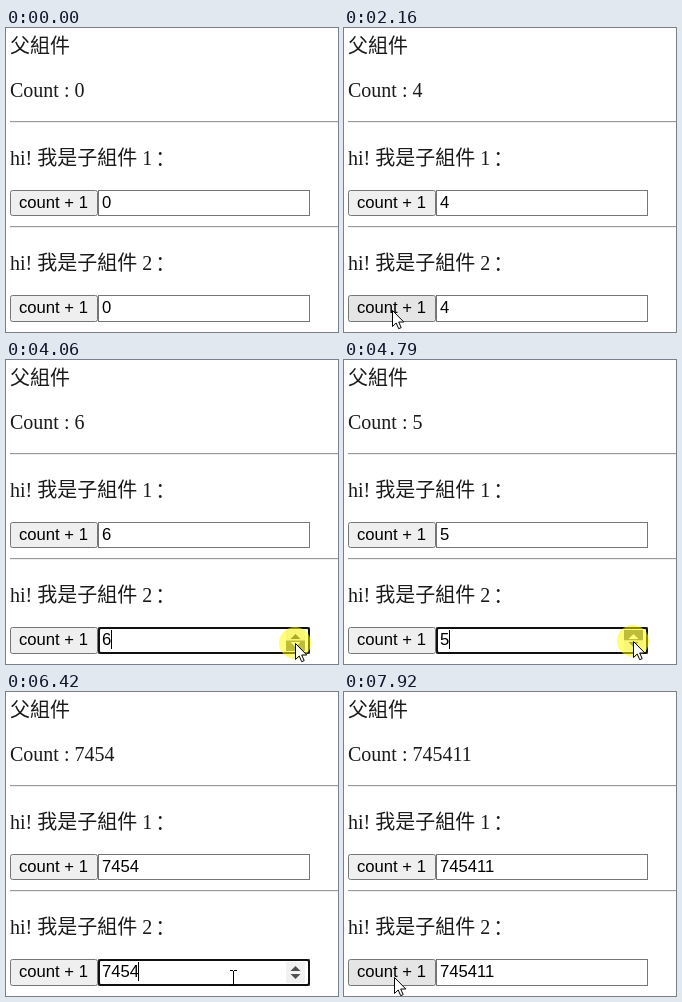
An HTML page for the animation above (7990 ms loop, 332 by 304 pixels).

```html
<!DOCTYPE html>
<html lang="zh-Hant">
<head>
<meta charset="utf-8">
<title>父組件</title>
<style>
html, body { margin: 0; width: 100%; height: 100%; overflow: hidden; background: #fff; }
svg { display: block; width: 332px; height: 304px; }
text { white-space: pre; fill: #000; }
.serif { font: 300 20px "Liberation Serif", "Noto Sans CJK TC", "Noto Sans CJK", serif; fill: #1a1a1a; }
.ui { font: 16.667px "Liberation Sans", Arial, sans-serif; }
.box { stroke: #767676; fill: #fff; }
.button { fill: #efefef; }
</style>
</head>
<body>
<svg id="stage" viewBox="0 0 332 304">
  <text class="serif" x="4" y="25">父組件</text>
  <text class="serif" x="4" y="69">Count : <tspan class="value">0</tspan></text>
  <g id="rows"></g>
  <g id="spin">
    <rect id="upBox" x="280" y="270" width="19" height="10.5"/>
    <rect id="downBox" x="280" y="280.5" width="19" height="10.5"/>
    <path id="upArrow" d="M284.5 279 l5 -5 l5 5z"/>
    <path id="downArrow" d="M284.5 282 l5 5 l5 -5z"/>
  </g>
  <rect id="ring" x="93" y="268" width="210" height="25" rx="2" fill="none" stroke="#101010" stroke-width="2"/>
  <rect id="caret" y="270" width="1" height="19"/>
  <g id="cursor">
    <circle id="halo" r="16" fill="#fffc00" fill-opacity=".52"/>
    <path id="arrow" d="M.5 .5 V16.5 L4.2 13 L6.7 18.7 L9.2 17.6 L6.7 12 H11.8 Z" fill="#fff" stroke="#000"/>
    <path id="beam" d="M-3 -7.5 h3 m1 0 h3 M.5 -7 V7 M-3 7.5 h3 m1 0 h3" fill="none" stroke="#000"/>
  </g>
</svg>
<script>
const LOOP = 7990, TICK = 70, PRESS = 75;
const $ = id => document.getElementById(id);

const row = (n, y, h) => `
  <path d="M4 ${y + .5} H332" stroke="#9a9a9a"/>
  <path d="M4 ${y + 1.5} H332" stroke="#eee"/>
  <text class="serif" x="4" y="${y + 44}">hi! 我是子組件 ${n}<tspan dx="-2" dy="1.5">：</tspan></text>
  <rect class="box button" x="4.5" y="${y + 69.5}" width="87" height="${h}" rx="2"/>
  <text class="ui" x="13" y="${y + 87}">count + 1</text>
  <rect class="box" x="92.5" y="${y + 69.5}" width="211" height="${h}"/>
  <text class="ui value" x="95.9" y="${y + 87}">0</text>`;
$('rows').innerHTML = row(1, 93, 25) + row(2, 198, 26);

const button = document.querySelectorAll('.button')[1];
const values = document.querySelectorAll('.value');

// Typed input turns the value into a string, so a later "+ 1" appends a digit
const add = v => v + 1;
const subtract = v => v - 1;
const type = key => v => v + key;

const repeat = (n, start, gap, make) => Array.from({ length: n }, (_, i) => make(start + i * gap, i));
const click = start => ({ start, end: start + PRESS, time: start + PRESS, edit: add });
const spin = edit => start => ({ start, end: start + PRESS, time: start, edit });

const events = [
  click(1280),
  ...repeat(5, 1760, 160, click),
  spin(add)(3600),
  ...repeat(3, 4000, 135, spin(subtract)),
  ...repeat(3, 4790, 140, spin(add)),
  ...repeat(3, 6100, 160, (time, i) => ({ time, edit: type('454'[i]) })),
  ...repeat(2, 7560, 280, click)
];
const FOCUS = [3600, 7560];

// Pointer legs: each eases from where the last one ended
const START = [308, 263];
const legs = [
  { from: 330, until: 750, to: [48, 282] },
  { from: 2610, until: 3170, to: [288, 281], arch: 11 },
  { from: 3930, until: 3930, to: [289, 283] },
  { from: 4390, until: 4390, to: [289, 281] },
  { from: 5130, until: 5410, to: [227, 286] },
  { from: 6950, until: 7440, to: [50, 285] }
];

function pointerAt(t) {
  if (t < legs[0].from) return null;
  let [x, y] = START;
  for (const { from, until, to, arch = 0 } of legs) {
    if (t < from) break;
    const step = Math.floor((t - from) / TICK) + 1;
    const u = Math.min(1, step * TICK / (until - from + TICK));
    const k = u * u * (3 - 2 * u);
    x += (to[0] - x) * k;
    y += (to[1] - y) * k - arch * Math.sin(Math.PI * k);
  }
  return [Math.round(x), Math.round(y)];
}

const inside = (p, x0, y0, x1, y1) => !!p && p[0] >= x0 && p[0] < x1 && p[1] >= y0 && p[1] < y1;
const show = (el, on) => el.setAttribute('visibility', on ? 'visible' : 'hidden');
const fill = (el, color) => el.setAttribute('fill', color);

function paintHalf(name, hover, down) {
  fill($(name + 'Box'), hover ? (down ? '#787878' : '#d2d2d2') : '#f1f1f1');
  fill($(name + 'Arrow'), hover && down ? '#fff' : '#505050');
}

function draw(t) {
  const done = events.filter(e => e.time <= t);
  const value = String(done.reduce((v, e) => e.edit(v), 0));
  const edited = done.length ? done.at(-1).time : 0;
  const p = pointerAt(t);
  const down = events.some(e => t >= e.start && t < e.end);
  const focus = t >= FOCUS[0] && t < FOCUS[1];
  const overInput = inside(p, 92, 267, 304, 294);
  const overSpin = inside(p, 280, 270, 299, 291);
  const overUp = overSpin && p[1] < 282;
  const beam = overInput && p[0] < 280;

  values.forEach(el => { if (el.textContent !== value) el.textContent = value; });
  button.style.fill = inside(p, 4, 267, 92, 294) ? (down ? '#f5f5f5' : '#e5e5e5') : '#efefef';

  show($('spin'), overInput || focus);
  paintHalf('up', overUp, down);
  paintHalf('down', overSpin && !overUp, down);

  show($('ring'), focus);
  show($('caret'), focus && (t - edited) % 1000 < 500);
  $('caret').setAttribute('x', Math.floor(95.9 + 9.27 * value.length));

  show($('halo'), !!p && down);
  show($('arrow'), !!p && !beam);
  show($('beam'), beam);
  if (p) $('cursor').setAttribute('transform', `translate(${p})`);
}

function tick() {
  draw(performance.now() % LOOP);
  requestAnimationFrame(tick);
}
tick();
</script>
</body>
</html>
```
